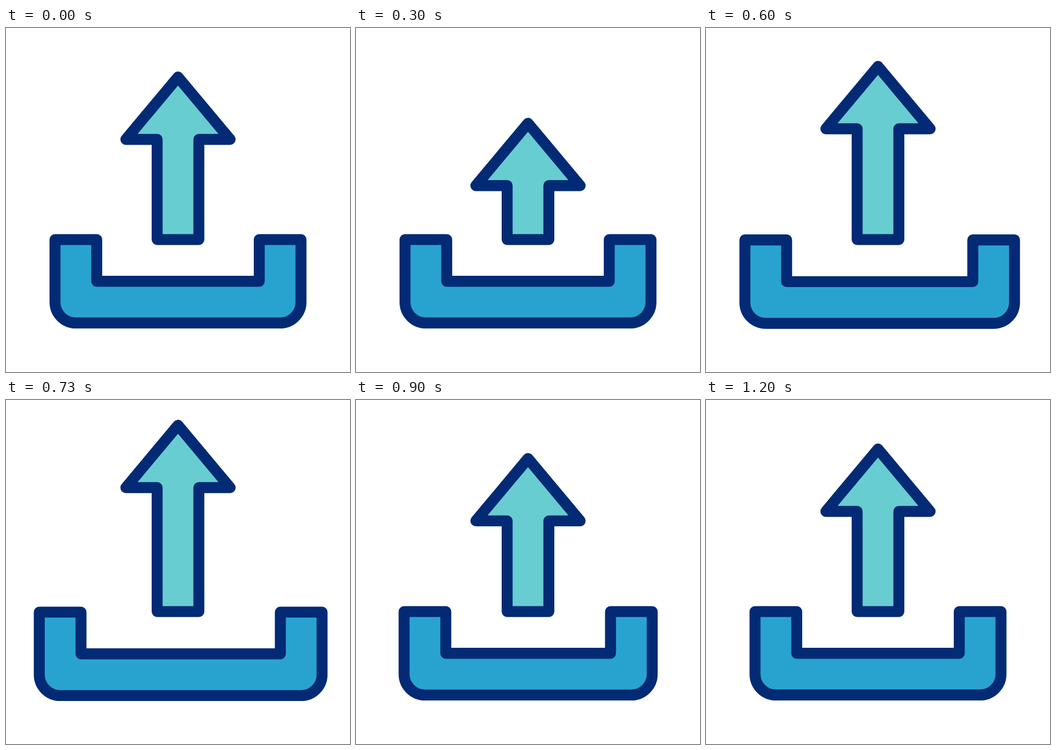
These frames come from a looping animation (640x640 px, 1.5 s). An HTML page:

```html
<!DOCTYPE html>
<html lang="en">
<head>
<meta charset="utf-8">
<title>Upload</title>
<style>
  html, body { margin: 0; width: 100%; height: 100%; overflow: hidden; background: #fff; }
  svg { display: block; width: 100%; height: 100%; }
  path { stroke: #032a74; stroke-width: 20.4; stroke-linejoin: round; }
  #tray { fill: #28a3cf; }
  #arrow { fill: #67cdd1; }
</style>
</head>
<body>
<svg viewBox="0 0 640 640">
  <path id="tray"/>
  <path id="arrow"/>
</svg>
<script>
  const LOOP = 1500, FPS = 30;
  const tray = document.getElementById('tray');
  const arrow = document.getElementById('arrow');

  // [frame, value] pairs, eased in and out between neighbours
  const lift = [[0, 0], [11.1, 95], [20.8, -48.8], [28.8, 27.5], [36, 0]];
  const spread = [[14, 0], [21, 1], [28, 0]];

  function valueAt(keys, f) {
    if (f <= keys[0][0]) return keys[0][1];
    for (let i = 1; i < keys.length; i++) {
      const [a, from] = keys[i - 1], [b, to] = keys[i];
      if (f < b) {
        const p = (f - a) / (b - a);
        return from + (to - from) * p * p * (3 - 2 * p);
      }
    }
    return keys[keys.length - 1][1];
  }

  function arrowPath(dy) {
    const tip = 91.2 + dy, base = 207.2 + dy;
    return `M320 ${tip}L417 ${base}H358.8V393.6H281.2V${base}H223Z`;
  }

  function trayPath(s) {
    const l = -31 * s, r = 41.5 * s, y = 1.1 * s;
    return `M${91.2 + l} ${393.6 + y}H${168.8 + l}V${471.2 + y}H${471.2 + r}V${393.6 + y}` +
      `H${548.8 + r}V${510 + y}a38.8 38.8 0 0 1 -38.8 38.8H${130 + l}a38.8 38.8 0 0 1 -38.8 -38.8Z`;
  }

  function draw(now) {
    // poses are held on a 30 fps grid
    const f = Math.floor((now % LOOP + 3.4) * FPS / 1000);
    arrow.setAttribute('d', arrowPath(valueAt(lift, f)));
    tray.setAttribute('d', trayPath(valueAt(spread, f)));
  }

  let start;
  function tick(now) {
    start ??= now;
    draw(now - start);
    requestAnimationFrame(tick);
  }
  draw(0);
  requestAnimationFrame(tick);
</script>
</body>
</html>
```
